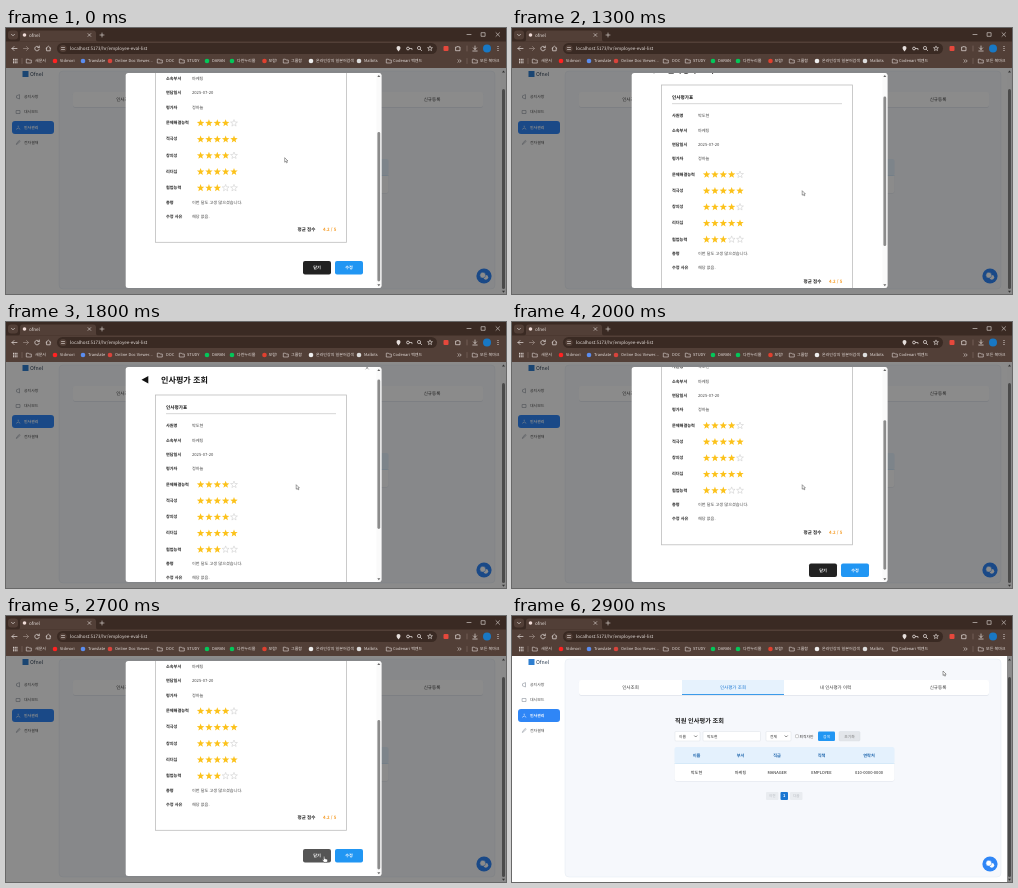
An HTML page that plays this animation: 500x266 px, repeating every 3000 ms.

```html
<!DOCTYPE html>
<html lang="ko">
<head>
<meta charset="utf-8">
<title>Employee evaluation</title>
<style>
  html, body { margin: 0; height: 100%; overflow: hidden; background: #fff; }
  svg { display: block; width: 500px; height: 266px; }
  text {
    font-family: "Noto Sans CJK KR", "Noto Sans CJK", "Noto Sans", sans-serif;
    text-rendering: geometricPrecision; white-space: pre;
  }
</style>
</head>
<body>
<svg id="stage" viewBox="0 0 500 266"></svg>
<script>
const LOOP = 3000, STEP = 100, MAX_SCROLL = 75.5, CLOSE_AT = 2800;
const BLUE = '#2196f3';

const rect = (x, y, w, h, fill, r = 0, extra = '') =>
  `<rect x="${x}" y="${y}" width="${w}" height="${h}" rx="${r}" fill="${fill}" ${extra}/>`;
const circle = (x, y, r, fill, extra = '') =>
  `<circle cx="${x}" cy="${y}" r="${r}" fill="${fill}" ${extra}/>`;
const line = (d, color, w = .7) =>
  `<path d="${d}" fill="none" stroke="${color}" stroke-width="${w}" stroke-linecap="round" stroke-linejoin="round"/>`;
const shape = (d, fill, extra = '') => `<path d="${d}" fill="${fill}" ${extra}/>`;
// y is the vertical middle of the text
const text = (x, y, s, size, fill = '#222', weight = 400, anchor = 'start') =>
  `<text x="${x}" y="${y + size * .36}" font-size="${size}" fill="${fill}" font-weight="${weight}" text-anchor="${anchor}">${s}</text>`;
const centered = (x, y, s, size, fill, weight) => text(x, y, s, size, fill, weight, 'middle');
const folder = (x, y) => line(`M${x - 2.3} ${y - 1.8}h1.7l.7.8h2.2v3h-4.6z`, '#ddd5d2', .6);

function starPath(cx, cy, r) {
  const points = Array.from({ length: 10 }, (_, i) => {
    const a = i * Math.PI / 5, k = i % 2 ? r * .42 : r;
    return `${(cx + k * Math.sin(a)).toFixed(2)} ${(cy - k * Math.cos(a)).toFixed(2)}`;
  });
  return `M${points.join('L')}z`;
}

function browser() {
  const ink = '#e6dfdc', strip = '#3a2a23', bar = '#523f37', seam = '#8a756c';
  const bookmarks = [
    [23, 29, '새문서', 0], [49, 54, 'Vidmori', '#f22'], [77, 82, 'Translate', '#5b8def'],
    [104, 109, 'Online Doc Viewer...', '#d8443c'], [154, 160, 'DOC', 0], [176, 181, 'STUDY', 0],
    [201, 206, 'DARAN', '#03c75a'], [226, 231, '다란누리몰', '#03c75a'], [258.5, 262.5, '모람!', '#e0402f'],
    [280, 285, '그룹함', 0], [305, 310, '온라인강의 일본어검색', '#eee'], [353, 358, 'Malbits', '#ddd'],
    [383, 387, 'Codenari 백엔드', 0], [469, 474, '모든 북마크', 0]
  ];
  return rect(0, 0, 500, 40, bar) + rect(0, 0, 500, 13.5, strip) +
    rect(2, 2.5, 10, 9, bar, 3) + line('M5.5 6.3l1.5 1.5 1.5-1.5', ink) +
    shape('M12 13.5q2 0 2-2v-6q0-3 3-3h70q3 0 3 3v6q0 2 2 2z', bar) +
    circle(18.5, 7, 1.8, '#f0dcd8') + text(23, 7, 'ofnel', 4.6, ink) +
    line('M82 5.6l2.8 2.8m0-2.8l-2.8 2.8M94 7h4m-2-2v4', ink, .6) +
    line('M461 6.5h4M475.5 4.7h3.6v3.6h-3.6zM490 4.7l3.6 3.6m0-3.6l-3.6 3.6', ink, .6) +
    line('M11 20.5H6m2-2l-2 2 2 2', ink) + line('M17.5 20.5h5m-2-2l2 2-2 2', '#9c8d86') +
    line('M33 19.3a2.3 2.3 0 1 0 .3 1.9M33.3 18v1.6h-1.6M40 20.4l2.4-2.2 2.4 2.2M40.6 20v2.8h3.6V20', ink) +
    rect(51, 15, 380, 11, strip, 5.5) + circle(57, 20.5, 3.6, bar) +
    line('M55.5 19.5h3m-3 2h3', ink, .6) +
    text(64, 20.5, 'localhost:5173/hr/employee-eval-list', 4.5, ink) +
    shape('M392.5 23.4q-2-2.2-2-3.4a2 2 0 0 1 4 0q0 1.2-2 3.4z', ink) +
    circle(402, 20.5, 1.4, 'none', `stroke="${ink}" stroke-width=".8"`) + line('M403.4 20.5h2.6v1.2', ink) +
    circle(413, 20, 1.6, 'none', `stroke="${ink}" stroke-width=".7"`) + line('M414.2 21.2l1.5 1.5', ink) +
    shape(starPath(424, 20.5, 2.6), 'none', `stroke="${ink}" stroke-width=".6"`) +
    rect(437.5, 18, 5, 5, '#e5483c', 1) + line('M450 19h1.3q.6-1.6 1.2 0h1.5v3.7h-4z', ink) +
    line('M461 18v5', seam, .6) + line('M469 18v3.4m-1.6-1.5l1.6 1.6 1.6-1.6M466.8 23h4.4', ink) +
    circle(481, 20.5, 4, '#1878c4') +
    [18.5, 20.5, 22.5].map(y => circle(492, y, .6, ink)).join('') +
    [0, 1, 2].map(i => [0, 1, 2].map(j => rect(7 + i * 1.7, 30.8 + j * 1.7, 1.1, 1.1, ink)).join('')).join('') +
    line('M16 30.5v5M461 30.5v5', seam, .5) + line('M452 31.7l1.2 1.3-1.2 1.3m2-2.6l1.2 1.3-1.2 1.3', ink, .6) +
    bookmarks.map(([x, tx, s, color]) =>
      (color ? circle(x, 33, 2.3, color) : folder(x, 33)) + text(tx, 33, s, 4, ink)).join('');
}

function page() {
  const ink = '#333', edge = 'stroke="#d5dae0" stroke-width=".4"';
  const menu = [[69, '공지사항'], [84, '대시보드'], [99.5, '인사관리'], [114.5, '전자결재']];
  const columns = [[184.5, '이름', '박도현'], [228.5, '부서', '마케팅'], [265, '직급', 'MANAGER'],
    [309.5, '직책', 'EMPLOYEE'], [357, '연락처', '010-0000-0000']];
  const tabs = [[118.5, '인사조회'], [221, '인사평가 조회'], [323.5, '내 인사평가 이력'], [426, '신규등록']];
  const chevron = x => line(`M${x} 119.8l1.2 1.2 1.2-1.2`, ink, .6);
  return rect(0, 40, 495, 226, '#fff') +
    rect(53, 43, 436, 218, '#f6f8fc', 4, 'stroke="#e3e8f0" stroke-width=".5"') +
    rect(16.5, 43, 6, 6, '#2f7fd0') + text(24, 46, 'Ofnel', 5.2, '#26384d', 500) +
    rect(6, 93, 42, 13, '#2f86f6', 3) +
    menu.map(([y, s], i) => {
      const on = i === 2, color = on ? '#fff' : '#444';
      const icon = [`M10.5 ${y - .8}v1.6l3 1.2v-4z`, `M10.5 ${y - 1.5}h3.5v3h-3.5z`,
        `M10.5 ${y + 1.5}q1.8-2.5 3.5 0M12.2 ${y - 1.4}v.6`, `M10.5 ${y + 1.6}l.5-1.4 2.4-2.2.8.8-2.4 2.2z`][i];
      return line(icon, on ? '#fff' : '#8b929c', .6) + text(18, y, s, 3.9, color, on ? 700 : 400);
    }).join('') +
    rect(67, 64.6, 410, 15.2, '#dfe4ec', 2) + rect(67, 64, 410, 15, '#fff', 2) +
    rect(170, 64, 102, 15, '#e6f2fd') + rect(170, 78, 102, 1, '#3b9bea') +
    tabs.map(([x, s], i) => centered(x, 71.5, s, 4.5, i === 1 ? '#1976d2' : ink, 500)).join('') +
    text(163, 104.5, '직원 인사평가 조회', 6.2, '#1c1c1c', 700) +
    rect(163, 115.5, 25, 9.5, '#fff', 1, edge) + text(167, 120.2, '이름', 3.8, ink) + chevron(182.5) +
    rect(191, 115.5, 57.5, 9.5, '#fff', 1, edge) + text(195, 120.2, '박도현', 3.8, ink) +
    rect(254, 115.5, 25, 9.5, '#fff', 1, edge) + text(258, 120.2, '전체', 3.8, ink) + chevron(273) +
    rect(283.5, 118.7, 3, 3, '#fff', .5, 'stroke="#888" stroke-width=".4"') + text(287.5, 120.2, '퇴직자만', 3.8, ink) +
    rect(306, 115.5, 17, 9.5, BLUE, 1.2) + centered(314.5, 120.2, '검색', 3.8, '#fff', 500) +
    rect(327, 115.5, 21, 9.5, '#e3e6ea', 1.2, edge) + centered(337.5, 120.2, '초기화', 3.8, '#777') +
    rect(162.5, 131.5, 220, 34, '#dfe4ec', 2) + rect(162.5, 131, 220, 34, '#fff', 2) +
    rect(162.5, 131, 220, 16.5, '#e4f1fd', 2) + rect(162.5, 147, 220, .6, '#c4dff6') +
    columns.map(([x, head, cell]) => centered(x, 139.3, head, 4.2, '#1f66ad', 700) +
      centered(x, 156.5, cell, 4.1, '#222')).join('') +
    rect(254, 176, 12.5, 8, '#e9ecf0', 1) + centered(260.2, 180, '이전', 3.6, '#b5b9bf') +
    rect(268.5, 176, 7.5, 8, '#1976d2', 1) + centered(272.2, 180, '1', 4, '#fff', 700) +
    rect(278, 176, 12.5, 8, '#e9ecf0', 1) + centered(284.2, 180, '다음', 3.6, '#b5b9bf') +
    circle(478, 248, 7.6, '#2f86f6') +
    circle(479.8, 249.3, 2.4, '#fff') + circle(476.8, 247.2, 2.9, '#fff', 'stroke="#2f86f6" stroke-width=".5"');
}

function pageScrollbar() {
  return rect(495, 40, 5, 226, '#8a8a8a') + rect(496, 61, 3, 200, '#4a4a4a', 1.5) +
    shape('M496 44.5h3l-1.5-2z', '#333') + shape('M496 262.7h3l-1.5 2z', '#333');
}

function form() {
  const ink = '#222';
  const fields = [[112, '사원명', '박도현'], [126.5, '소속부서', '마케팅'], [140.5, '면담일시', '2025-07-20'],
    [155, '평가자', '정하늘'], [249.8, '총평', '이번 달도 고생 많으셨습니다.'], [264, '수정 사유', '해당 없음.']];
  const ratings = [['문제해결능력', 4], ['적극성', 5], ['창의성', 4], ['리더십', 5], ['협업능력', 3]];
  const stars = (score, y) => [0, 1, 2, 3, 4].map(i => i < score
    ? shape(starPath(194.6 + i * 8.35, y + .4, 3.9), '#fcc21b')
    : shape(starPath(194.6 + i * 8.35, y + .4, 3.6), '#fff', 'stroke="#bbb" stroke-width=".4"')).join('');
  return line('M359.8 52.5l2.6 2.6m0-2.6l-2.6 2.6', '#555', .5) +
    shape('M142.3 62v7.6l-6.8-3.8z', '#111') + text(155, 66.3, '인사평가 조회', 8.1, '#111', 700) +
    rect(149.5, 81, 191, 208.8, '#fff', 0, 'stroke="#bdbdbd" stroke-width=".8"') +
    text(160, 93, '인사평가표', 4.6, '#111', 700) + rect(160, 99.5, 170, .6, '#bbb') +
    fields.map(([y, label, value]) => text(160, y, label, 4.15, ink, 700) + text(186, y, value, 4.15, '#444')).join('') +
    ratings.map(([label, score], i) => {
      const y = 170.3 + i * 16.2;
      return text(160, y, label, 4.15, ink, 700) + stars(score, y);
    }).join('') +
    text(291.5, 277.3, '평균 점수', 4.5, ink, 700) + text(317, 277.3, '4.2 / 5', 4.4, '#f59a23', 700) +
    rect(297, 308.5, 28, 13.5, '#222', 2, 'id="close"') + centered(311, 315.2, '닫기', 4.2, '#fff', 700) +
    rect(329, 308.5, 28, 13.5, BLUE, 2) + centered(343, 315.2, '수정', 4.2, '#fff', 700);
}

function modal() {
  return `<g id="modal">${rect(0, 40, 495, 226, '#000', 0, 'opacity=".455"')}
    ${rect(119.7, 45, 255.8, 215, '#fff', 2.5)}
    <g clip-path="url(#view)"><g id="form">${form()}</g></g>
    ${rect(370.5, 45.5, 4.7, 214, '#fafafa', 2)}
    ${shape('M371.3 49h3l-1.5-2z', '#666')}${shape('M371.3 256.3h3l-1.5 2z', '#666')}
    ${rect(371.4, 52, 2.8, 149.5, '#8b8b8b', 1.4, 'id="thumb"')}</g>`;
}

const outline = 'stroke="#333" stroke-width=".45" stroke-linejoin="round"';
document.getElementById('stage').innerHTML =
  `<clipPath id="view">${rect(119.7, 45, 250.8, 215, '#000', 2.5)}</clipPath>
  <g id="page">${page()}</g>${modal()}${pageScrollbar()}${browser()}
  <g id="arrow">${shape('M0 0v4.5l1-.9.8 1.6.8-.4-.8-1.6h1.4z', '#fff', outline)}</g>
  <g id="hand">${shape('M0 0q.8-.8 1.2.3v1.8l2.3.6q.8.2.6 1.2l-.5 2H.5L-1.3 3.3q.3-.8 1.3.1z', '#fff', outline)}</g>`;

const [pageEl, modalEl, formEl, thumbEl, closeEl, arrowEl, handEl] =
  ['page', 'modal', 'form', 'thumb', 'close', 'arrow', 'hand'].map(id => document.getElementById(id));

// keys: [time, value, ...], linear in between
function sample(keys, t) {
  const next = keys.findIndex(k => k[0] > t);
  if (next === 0) return keys[0].slice(1);
  if (next < 0) return keys.at(-1).slice(1);
  const a = keys[next - 1], b = keys[next], p = (t - a[0]) / (b[0] - a[0]);
  return a.slice(1).map((v, i) => v + (b[i + 1] - v) * p);
}

const pointerKeys = [[500, 278.7, 129.7], [800, 284.2, 149.7], [1100, 290.2, 162.7], [2300, 290.2, 162.7],
  [2700, 317.5, 240.5], [2900, 431, 55]];
const scrollKeys = [[1100, MAX_SCROLL], [1200, 58], [1300, 24], [1400, 5], [1500, 0], [1700, 0],
  [1800, 8], [1900, 38], [2000, 67], [2100, 74], [2200, MAX_SCROLL]];

function render(now) {
  const t = Math.floor(now % LOOP / STEP) * STEP;
  const [x, y] = sample(pointerKeys, t), [scroll] = sample(scrollKeys, t);
  const open = t < CLOSE_AT, hover = open && y > 233;
  modalEl.style.display = open ? '' : 'none';
  pageEl.style.filter = open ? 'blur(.7px)' : 'none';
  formEl.setAttribute('transform', `translate(0 ${-scroll})`);
  thumbEl.setAttribute('y', 52 + scroll * 52 / MAX_SCROLL);
  closeEl.setAttribute('fill', hover ? '#555' : '#222');
  for (const el of [arrowEl, handEl]) {
    el.setAttribute('transform', `translate(${x} ${y})`);
    el.style.display = (el === handEl) === hover ? '' : 'none';
  }
}

const start = performance.now();
(function tick() {
  render(performance.now() - start);
  requestAnimationFrame(tick);
})();
</script>
</body>
</html>
```
